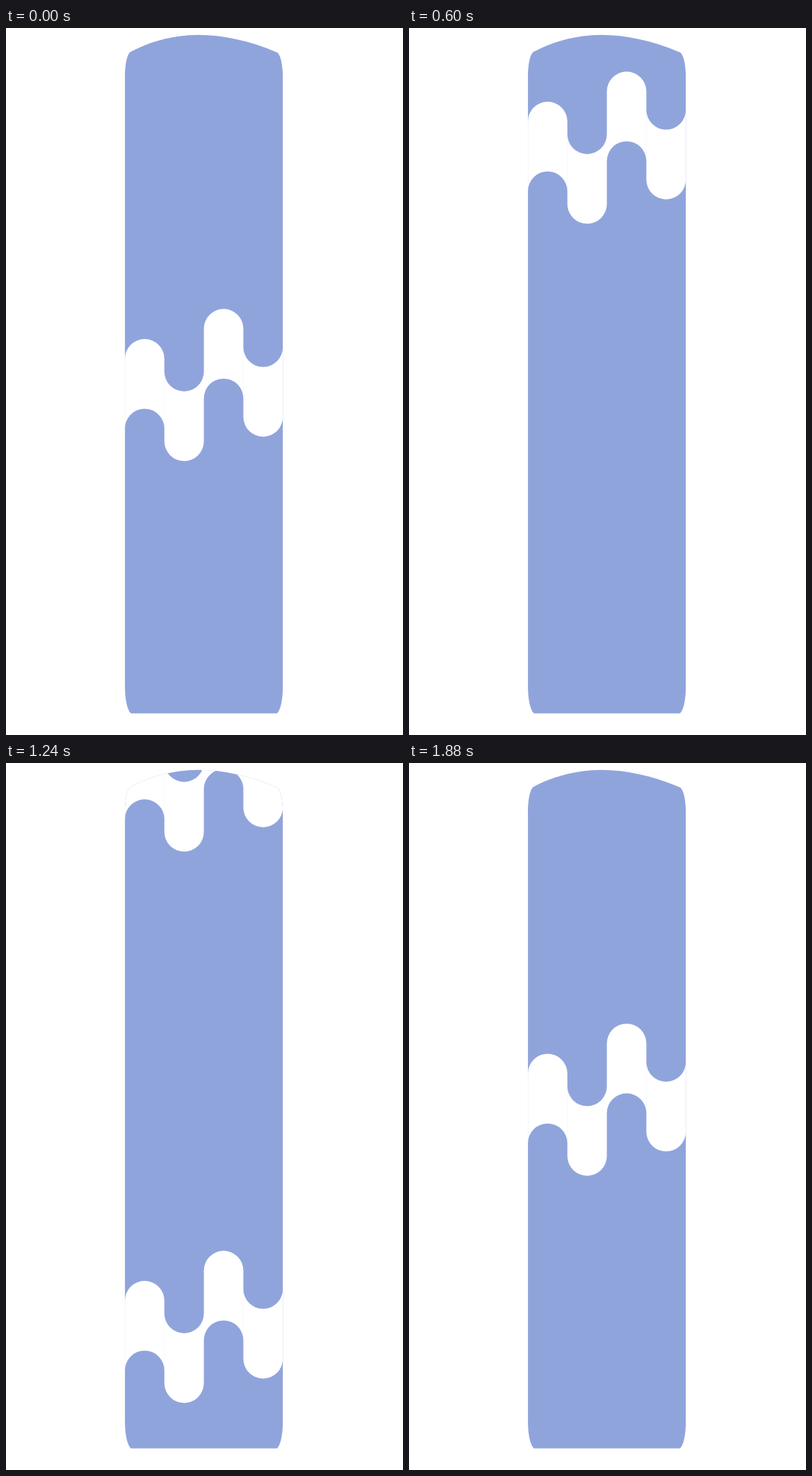
Write an HTML page that moves like this. It is 561 px wide and 998 px high and loops after 1920 ms.

```html
<!DOCTYPE html>
<html lang="en">
<head>
<meta charset="utf-8">
<title>Flowing bands</title>
<style>
html, body { margin: 0; width: 100%; height: 100%; overflow: hidden; background: #fff; }
svg { display: block; width: 561px; height: 998px; }
</style>
</head>
<body>
<svg viewBox="0 0 561 998">
  <defs>
    <path id="tube" d="M176.3 33.5C235 2 305 1.5 383 34.5C387.5 37 391.2 50 391.2 70V930
      C391.2 948 388 963 383 967.5H176.5C171.5 963 168.1 948 168.1 930V70C168.1 50 171.5 36 176.3 33.5Z"/>
    <clipPath id="inside"><use href="#tube"/></clipPath>
    <g id="band">
      <path fill="#fff" d="M168 28a27.9 27.9 0 0 1 55.8 0V46a27.9 27.9 0 0 0 55.8 0V-14.6
        a27.9 27.9 0 0 1 55.8 0V11.6a27.9 27.9 0 0 0 55.8 0V110a27.9 27.9 0 0 1 -55.8 0V83.8
        a27.9 27.9 0 0 0 -55.8 0V144.4a27.9 27.9 0 0 1 -55.8 0V126.4a27.9 27.9 0 0 0 -55.8 0Z"/>
      <path stroke="#90a4dc" stroke-opacity=".08" d="M223.8 46V126.4M335.4 11.6V83.8"/>
    </g>
  </defs>
  <use href="#tube" fill="#90a4dc"/>
  <g clip-path="url(#inside)">
    <use class="band" href="#band"/>
    <use class="band" href="#band"/>
    <use class="band" href="#band"/>
  </g>
</svg>
<script>
const LOOP = 1920, STEP = 40;
const bands = document.querySelectorAll('.band');

// Each band falls slowly at first, then faster (px per ms).
const tracks = [
  t => 439 + 0.975 * t,
  t => t < 680 ? 104 + 0.7725 * (t - 600) : 731 + 1.0094 * (t - 1240),
  t => 439 + 0.715 * (t - LOOP)
];

function draw(now) {
  const t = Math.floor(now / STEP + 0.02) * STEP % LOOP;
  tracks.forEach((y, i) => bands[i].setAttribute('transform', `translate(0 ${y(t)})`));
  requestAnimationFrame(draw);
}
draw(0);
</script>
</body>
</html>
```
